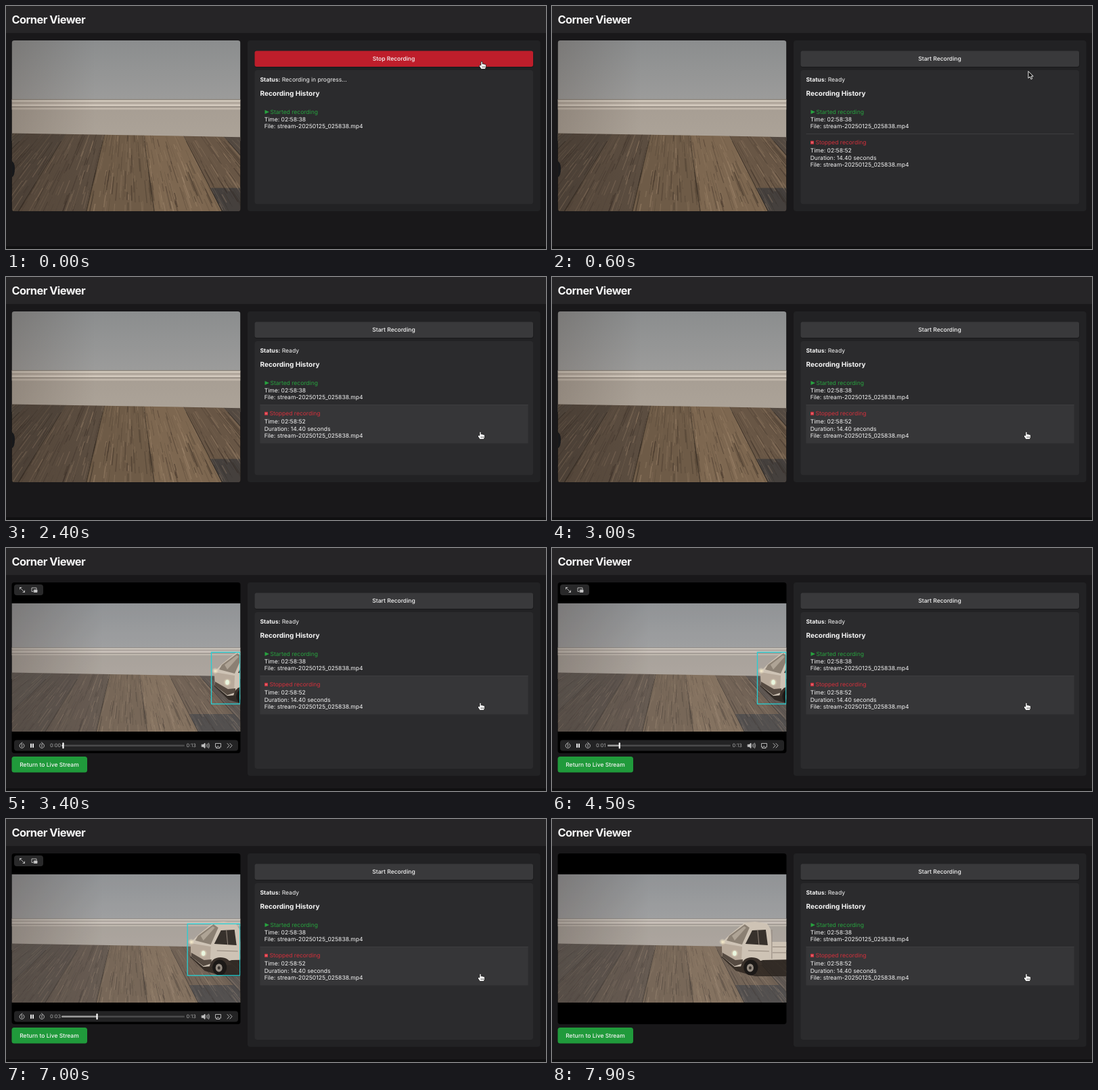
Recreate the animation shown at these times as an HTML page. Size 798 px wide and 360 px high, loop 8000 ms.

```html
<!DOCTYPE html>
<html lang="en">
<head>
<meta charset="utf-8">
<title>Corner Viewer</title>
<style>
html, body { margin: 0; width: 100%; height: 100%; overflow: hidden; background: #19181a; }
svg { display: block; }
text { font: 400 8.54px Inter, "Liberation Sans", sans-serif; fill: #f6f6f6; text-rendering: geometricPrecision; }
.bold { font-weight: 700; }
.mid { text-anchor: middle; font-weight: 500; }
.clock { font-size: 7.4px; fill: #a9a9a9; }
.icon { fill: none; stroke: #c4c4c4; stroke-width: .9; stroke-linecap: round; stroke-linejoin: round; }
</style>
</head>
<body>
<svg width="798" height="360" viewBox="0 0 798 360">
  <defs>
    <linearGradient id="wall" x2="0" y2="1">
      <stop stop-color="#8b8d8e"/><stop offset="1" stop-color="#9c9c9b"/>
    </linearGradient>
    <linearGradient id="board" x2="0" y2="1">
      <stop stop-color="#a69d93"/><stop offset="1" stop-color="#aca398"/>
    </linearGradient>
    <linearGradient id="shade">
      <stop stop-color="#382a20" stop-opacity=".3"/>
      <stop offset=".4" stop-color="#382a20" stop-opacity="0"/>
    </linearGradient>
    <radialGradient id="glow">
      <stop stop-color="#fff3cf" stop-opacity=".9"/><stop offset="1" stop-color="#fff3cf" stop-opacity="0"/>
    </radialGradient>
    <clipPath id="frame"><rect x="8.5" y="51" width="338" height="253" rx="4"/></clipPath>
    <clipPath id="ground"><path d="M8 184.500L50 185.200L304 189.500L347 190.300V272H8Z"/></clipPath>
  </defs>

  <rect width="798" height="40" fill="#262527"/>
  <rect y="356" width="798" height="4" fill="#101011"/>
  <text class="bold" x="8.5" y="26" style="font-size:16.4px;letter-spacing:-.55px">Corner Viewer</text>

  <g clip-path="url(#frame)">
    <rect x="8" y="51" width="339" height="253"/>
    <svg id="view" x="8.5" width="338" viewBox="8.5 82 338 190" preserveAspectRatio="xMidYMid slice">
      <rect x="8" y="82" width="339" height="67" fill="url(#wall)"/>
      <rect x="8" y="148" width="339" height="46" fill="url(#board)"/>
      <g id="trim"></g>
      <g id="floor" clip-path="url(#ground)"></g>
      <rect x="8" y="82" width="339" height="190" fill="url(#shade)"/>
      <rect id="daylight" x="8" y="82" width="339" height="190" fill="#b4bccb" opacity=".13"/>
      <path id="object" d="M46 215q8 0 8 9t-3 10l-5 2z" fill="#17181b"/>
      <g id="truck">
        <path d="M250 204L272 225L300 233H410V206Z" fill="#231c17" opacity=".75"/>
        <path d="M251 183L262 172L285 153.5L300 152L318 155L323 163L325 182H410V207L312 209L283 218L270 219L252 204Z" fill="#cec3b5"/>
        <path d="M262 173L285 156L292 161L281 186L258 180Z" fill="#8b8073"/>
        <path d="M266 173L284 159L287 161L270 180Z" fill="#aea395"/>
        <path d="M286 185L296 165L316 164L319 187Z" fill="#37312c"/>
        <path d="M251 184L281 189L280 214L270 217L252 203Z" fill="#b8aa9b"/>
        <path d="M252 198L271 209L282 208V214L270 218L252 204Z" fill="#564b42"/>
        <path d="M304 165L306 186M325 164V207M290 195L321 196M326 189.500H410M326 198H410" fill="none" stroke="#91857a"/>
        <path d="M279 219Q282 205 295 205T311 216Z" fill="#39302a"/>
        <ellipse cx="294" cy="220" rx="10.500" ry="11.500" fill="#1c1917"/>
        <ellipse cx="293" cy="220.500" rx="5" ry="6" fill="#958c82"/>
        <ellipse cx="293" cy="220.500" rx="2" ry="2.500" fill="#3b3530"/>
        <circle cx="252" cy="182" r="5" fill="url(#glow)"/>
        <circle cx="270" cy="199" r="6" fill="url(#glow)"/>
        <ellipse cx="270" cy="199" rx="2.800" ry="3.800" fill="#e9f6df"/>
      </g>
      <rect id="target" height="76.500" fill="none" stroke="#25d0d5" stroke-width="1.300"/>
    </svg>
    <g id="controls">
      <rect x="12" y="54" width="43" height="16" rx="4" fill="#29292a"/>
      <g class="icon">
        <path d="M20.500 61V58.500H23M20.500 58.500L27.500 65.500M27.500 63V65.500H25"/>
        <path d="M40 64.500H38V59H45V61"/>
        <rect x="41.500" y="62" width="4.500" height="3.500" fill="#c4c4c4"/>
      </g>
      <rect x="12" y="284.500" width="331" height="16" rx="4" fill="#232324"/>
      <g class="icon">
        <path d="M22 289.700A3.500 3.500 0 1 0 25 289.700M24 288L22 289.700L24 291.200M23.500 292V294.500"/>
        <path d="M54.500 289.700A3.500 3.500 0 1 1 51.500 289.700M52.500 288L54.500 289.700L52.500 291.200M53 292V294.500"/>
        <path d="M37 289.700V295.700M40 289.700V295.700" stroke="#fff" stroke-width="1.800" stroke-linecap="butt"/>
        <path d="M289.500 291.300H291.500L294 289V296.500L291.500 294.300H289.500Z" fill="#c4c4c4"/>
        <path d="M296 291.200Q297 292.700 296 294.200M297.800 290Q299.500 292.700 297.800 295.500M299.500 289Q302 292.700 299.500 296.500"/>
        <path d="M311 295H309.500V289.500H317.500V295H316M313.500 293.500L316 296.500H311Z"/>
        <path d="M327 289.500L330 292.700L327 296M331 289.500L334 292.700L331 296"/>
      </g>
      <rect x="82" y="291.400" width="182" height="2.600" rx="1.300" fill="#4a4a4b"/>
      <rect id="played" x="82" y="291.400" height="2.600" rx="1.300" fill="#9b9b9b"/>
      <rect id="knob" y="288.200" width="2.200" height="9" rx="1" fill="#fff"/>
      <text class="clock" id="clock" x="65" y="295.400"></text>
      <text class="clock" x="266.500" y="295.400">0:13</text>
    </g>
  </g>
  <g id="back">
    <rect x="8.500" y="309" width="111.500" height="23.500" rx="3.500" fill="#209a3b"/>
    <text class="mid" x="64" y="323.900">Return to Live Stream</text>
  </g>

  <rect id="panel" x="357" y="51" width="432.500" rx="4" fill="#222224"/>
  <rect x="367.500" y="67.500" width="412" height="23.500" rx="3" fill="#111" opacity=".5"/>
  <rect id="button" x="367.500" y="66.500" width="411.500" height="23.500" rx="3"/>
  <text class="mid" id="label" x="573" y="81.100"></text>
  <rect id="history" x="367.500" y="95" width="411.500" rx="4" fill="#2b2b2d"/>
  <text x="375.500" y="111.500"><tspan class="bold">Status:</tspan> <tspan id="status"></tspan></text>
  <text class="bold" x="375.500" y="133.300" style="font-size:10px">Recording History</text>
  <path d="M382.500 154L389 157L382.500 160Z" fill="#27a33f"/>
  <text x="390.500" y="160" style="fill:#27a33f">Started recording</text>
  <text x="381.700" y="170.600">Time: 02:58:38</text>
  <text x="381.700" y="181.200">File: stream-20250125_025838.mp4</text>
  <g id="stopped">
    <rect id="row" x="375.500" y="189" width="396" height="57.500" fill="#363638"/>
    <path d="M375.500 189.500H771.500" stroke="#3d3d3f"/>
    <rect x="382" y="199.800" width="5" height="5" rx=".6" fill="#d3303c"/>
    <path d="M383.800 201V203.600M385.200 201V203.600" stroke="#f0b5b9" stroke-width=".6"/>
    <text x="389.500" y="205.300" style="fill:#d3303c">Stopped recording</text>
    <text x="381.700" y="217">Time: 02:58:52</text>
    <text x="381.700" y="227.600">Duration: 14.40 seconds</text>
    <text x="381.700" y="238.300">File: stream-20250125_025838.mp4</text>
  </g>

  <g id="cursor" stroke-linejoin="round">
    <path id="arrow" d="M0 0V10.300L2.400 8.100L4 11.800L5.800 11L4.200 7.400H7.300Z" fill="#111" stroke="#fff" stroke-width=".9"/>
    <g id="hand" stroke="#111" stroke-width=".8">
      <path d="M-1.200 6V.8Q0 -.8 1.100 .8V4Q2.200 3 3 4.200Q4.200 3.400 4.800 4.600Q6.200 4.200 6.400 5.500V8.200L5.300 11.500H-.6L-3.500 7.500Q-4 5.600 -2.500 5.600Z" fill="#fff"/>
      <path d="M1 7.200V9.500M2.700 7.200V9.500M4.400 7.200V9.500" stroke-width=".6"/>
    </g>
  </g>
</svg>
<script>
const $ = id => document.getElementById(id);
const set = (id, attrs) => { for (const k in attrs) $(id).setAttribute(k, attrs[k]); };
const show = (id, on) => { $(id).style.display = on ? "" : "none"; };
const clamp = v => Math.max(0, Math.min(1, v));
const ease = v => v * v * (3 - 2 * v);

let seed = 7;
const rnd = () => (seed = seed * 16807 % 2147483647) / 2147483647;

// Floor boards run towards one vanishing point above the skirting.
const ray = (x, y) => `${(181 + (x - 181) * (y - 70) / 118).toFixed(1)} ${y.toFixed(1)}`;
const strip = (a, b, y1, y2, fill, alpha = 1) =>
  `<path d="M${ray(a, y1)}L${ray(b, y1)}L${ray(b, y2)}L${ray(a, y2)}Z" fill="${fill}" opacity="${alpha}"/>`;

function buildRoom() {
  const tones = ["#4c443d", "#51483f", "#51463c", "#5b4d40", "#6e5b47", "#7d6750", "#685645", "#544a42"];
  let art = tones.map((c, i) => strip(-23 + i * 44, 21 + i * 44, 183, 272, c)).join("");
  art += strip(241, 286, 246, 272, "#45403d");
  for (let i = 0; i < 900; i++) {
    const x = -20 + rnd() * 365, y = 180 + rnd() * 85;
    const fill = rnd() < .55 ? "#2a211b" : "#b0967a";
    art += strip(x, x + .2 + rnd() * .7, y, y + 5 + rnd() * 22, fill, (.1 + rnd() * .3).toFixed(2));
  }
  for (let i = 0; i < 8; i++) art += strip(21 + i * 44, 21.5 + i * 44, 183, 272, "#2b231d", .6);
  $("floor").innerHTML = art;

  const bands = [[147.3, 1, "#857e76"], [148.3, 2.2, "#cfc6ba"], [150.5, 2.5, "#b2a89d"],
    [153, 2.4, "#d3c9bd"], [155.4, 1.2, "#8b8279"], [156.6, 2.4, "#c0b6aa"]];
  $("trim").innerHTML = bands.map(([y, h, c]) =>
    `<rect x="8" y="${y}" width="339" height="${h}" fill="${c}"/>`).join("");
}

// Pointer stops: time, x, y
const stops = [[0, 703, 82], [500, 703, 82], [1100, 715, 280], [1500, 715, 280], [2000, 701, 229], [8000, 701, 229]];
function pointer(t) {
  const i = stops.findIndex(s => s[0] > t);
  const a = stops[i - 1], b = stops[i], k = ease((t - a[0]) / (b[0] - a[0]));
  return [a[1] + (b[1] - a[1]) * k, a[2] + (b[2] - a[2]) * k];
}

function draw() {
  const t = Math.floor(performance.now() % 8000 / 100) * 100;
  const recording = t < 500, playback = t >= 3200;

  const [x, y] = pointer(t);
  const onRow = !recording && y > 189 && y < 246;
  const hand = onRow || (y > 66 && y < 90);
  set("cursor", { transform: `translate(${x} ${y})` });
  show("hand", hand);
  show("arrow", !hand);

  set("button", { fill: recording ? "#be1e2b" : "#39393b" });
  $("label").textContent = recording ? "Stop Recording" : "Start Recording";
  $("status").textContent = recording ? "Recording in progress..." : "Ready";
  show("stopped", !recording);
  show("row", onRow);

  set("view", playback ? { y: 82, height: 190 } : { y: 51, height: 253 });
  set("panel", { height: playback ? 286.5 : 253 });
  set("history", { height: playback ? 232 : 198.5 });
  for (const id of ["truck", "controls", "back", "daylight"]) show(id, playback);
  show("object", !playback);
  show("target", playback && t < 7200);

  const dx = 57 - Math.max(0, t - 5540) * .0242;
  set("truck", { transform: `translate(${dx} 0)` });
  set("target", { x: 246.5 + dx, y: t < 5540 ? 154.5 : 155.3, width: 99.3 - dx });

  const sec = Math.max(0, t - 3300) / 1000, run = sec * 13.9;
  $("clock").textContent = "0:0" + Math.floor(sec);
  set("played", { width: run + 1 });
  set("knob", { x: 82 + run });
  set("controls", { opacity: clamp((7500 - t) / 300) });
  requestAnimationFrame(draw);
}

buildRoom();
draw();
</script>
</body>
</html>
```
